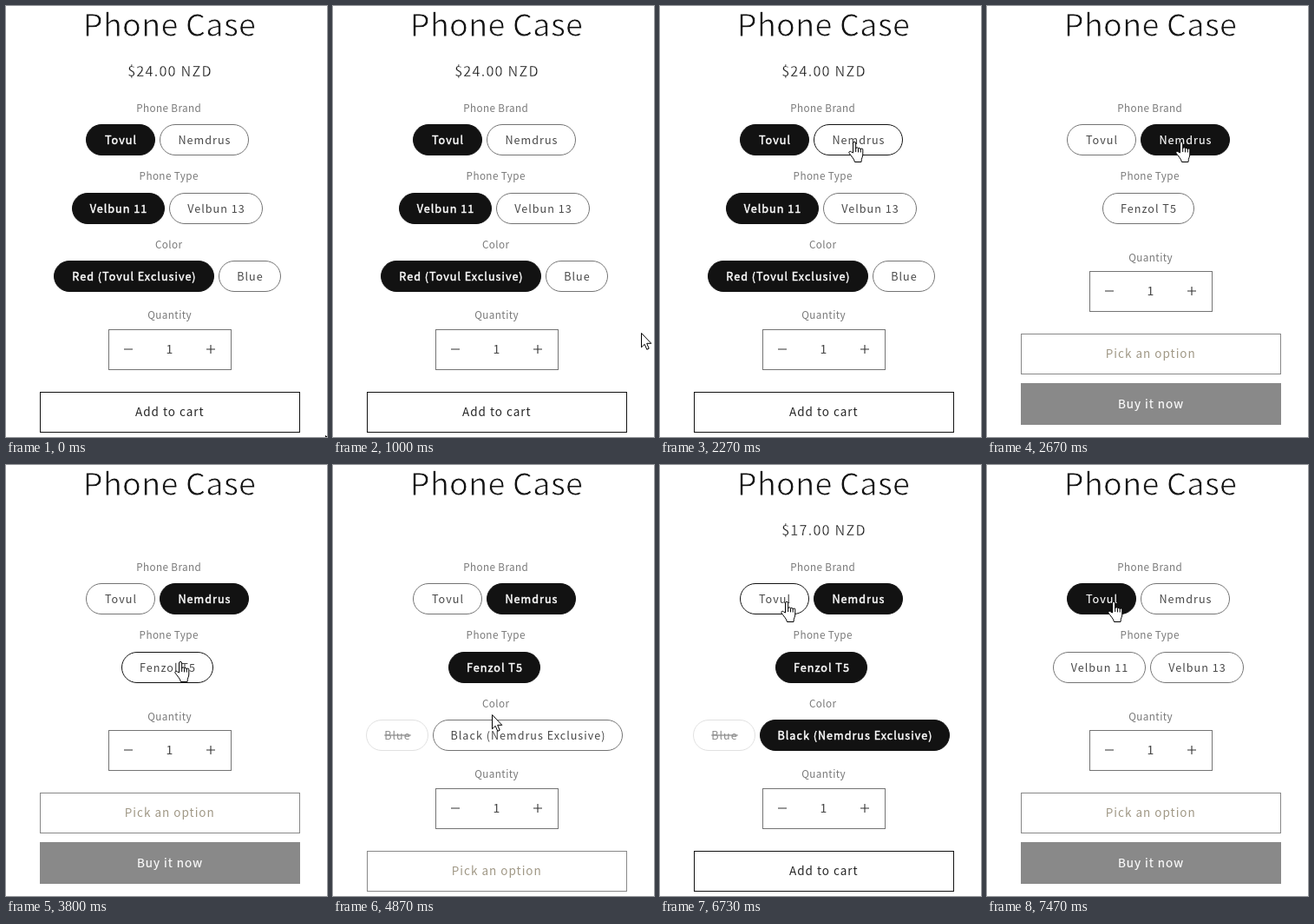
Write an HTML page that moves like this. It is 370x496 px and loops after 8 s.

```html
<!DOCTYPE html>
<html lang="en">
<head>
<meta charset="utf-8">
<title>Phone case options</title>
<style>
  html, body { margin: 0; width: 100%; height: 100%; overflow: hidden; background: #fff; }
  svg { display: block; width: 370px; height: 496px; }
  text {
    font-family: "Noto Sans CJK JP", "Noto Sans CJK SC", "Noto Sans CJK", "Noto Sans", sans-serif;
    font-weight: 400; fill: #121212; text-anchor: middle; white-space: pre;
  }
  rect { fill: none; stroke: #747474; }
  /* A white outline thins the letters */
  .title { font-size: 36px; letter-spacing: .3px; stroke: #fff; stroke-width: .8px; }
  .price { font-size: 16.2px; letter-spacing: 1.2px; stroke: #fff; stroke-width: .3px; }
  .label { font-size: 11.7px; letter-spacing: .4px; fill: #787878; }
  .count { font-size: 14px; fill: #484848; }
  .button { font-size: 13.5px; letter-spacing: 1px; }
  .pill text { font-size: 12.6px; letter-spacing: 1px; fill: #484848; }
  .pill.hover rect { stroke: #121212; }
  .pill.on rect { fill: #121212; stroke: #121212; }
  .pill.on text { fill: #fff; stroke: #fff; stroke-width: .45px; }
  .pill.on.hover text { stroke-width: .15px; }
  .pill.off rect { stroke: #e1e1e1; }
  .pill.off text { fill: #8c8c8c; text-decoration: line-through; }
  rect.add { stroke: #121212; }
  text.add { fill: #262626; }
  rect.wait { stroke: #888; }
  text.wait { fill: #a09886; }
  rect.buy { fill: #898989; stroke: none; }
  text.buy { fill: #fff; stroke: #fff; stroke-width: .15px; }
  .sign { stroke: #333; stroke-width: 1.1; }
  #cursor path { fill: #fff; stroke: #000; stroke-linejoin: round; }
</style>
</head>
<body>
<svg viewBox="0 0 370 496">
  <text class="title" x="188.6" y="35">Phone Case</text>
  <g id="form"></g>
  <g id="cursor">
    <path id="arrow" d="M.5.5V16.8L4.2 13.3 6.8 19.3 9.2 18.2 6.7 12.3H11.8Z"/>
    <g id="hand" transform="translate(-7 0)">
      <path d="M5.5 13V2a1.6 1.6 0 0 1 3.2 0V8a1.4 1.4 0 0 1 2.8.4a1.4 1.4 0 0 1 2.7.6a1.3 1.3 0 0 1 2.6.8V15C16.8 18 15 19 15 23.5H7.5C7 20 3 16.5 1 13.2C.2 11.6 2 10.6 3.4 11.8Z"/>
      <path d="M8.7 8v4M11.5 8.4v4M14.2 9v3.5"/>
    </g>
  </g>
</svg>
<script>
const FPS = 15, LOOP = 8000;
const $ = id => document.getElementById(id);

// Easing curves
const linear = p => p;
const smooth = p => p * p * (3 - 2 * p);
const soft = p => (p + smooth(p)) / 2;
const speedUp = p => p ** 1.5;
const slowDown = p => 1 - (1 - p) ** 1.5;

// Pointer path: tick, x, y, easing from the previous point
const path = [
  [8, 368, 494, linear], [21, 344, 279, soft], [24, 324, 241, linear], [34, 224, 156, slowDown],
  [49, 224, 156, linear], [57, 201, 226, smooth], [67, 201, 226, linear],
  [73, 183, 287, speedUp], [76, 183, 311, slowDown], [94, 183, 311, linear], [101, 146, 157, smooth]
];

function pointer(tick) {
  const i = path.findIndex(k => k[0] >= tick);
  if (i < 0) return path[path.length - 1].slice(1, 3);
  if (i === 0) return path[0].slice(1, 3);
  const [t0, x0, y0] = path[i - 1], [t1, x1, y1, ease] = path[i];
  const p = ease((tick - t0) / (t1 - t0));
  return [Math.round(x0 + (x1 - x0) * p), Math.round(y0 + (y1 - y0) * p)];
}

// Each pill: name, left, right, top, state
function pills(tick) {
  const on = test => test ? "on" : "";
  const first = tick < 40 || tick >= 112;
  const list = [
    ["Tovul", 92, 172, 136, on(first)],
    ["Nemdrus", 177, 280, 136, on(!first)]
  ];
  if (first) {
    list.push(["Velbun 11", 76, 183, 215, on(tick < 40)], ["Velbun 13", 188, 296, 215, ""]);
  } else {
    list.push(["Fenzol T5", 133, 239, 215, on(tick >= 60)]);
  }
  if (tick < 40) {
    list.push(["Red (Tovul Exclusive)", 55, 240, 293, "on"], ["Blue", 245, 317, 293, ""]);
  } else if (tick >= 60 && tick < 112) {
    list.push(["Blue", 38, 110, 293, "off"], ["Black (Nemdrus Exclusive)", 115, 334, 293, on(tick >= 79)]);
  }
  return list;
}

const text = (kind, x, y, value) => `<text class="${kind}" x="${x}" y="${y}">${value}</text>`;
const box = (kind, x, y, w, h, r = 0) =>
  `<rect class="${kind}" x="${x + .5}" y="${y + .5}" width="${w - 1}" height="${h - 1}" rx="${r}"/>`;
const label = (y, value) => text("label", 187.7, y, value);

function pill([name, left, right, top, state], hover) {
  return `<g class="pill ${state} ${hover ? "hover" : ""}">` +
    box("", left, top, right - left, 36, 17.5) +
    text("", (left + right) / 2 + .5, top + 23, name) + "</g>";
}

function footer(compact, ready) {
  const dy = compact ? -67 : 0, kind = ready ? "add" : "wait", mid = 395 + dy;
  let out = text("label", 188.7, compact ? 294 : 360, "Quantity") +
    box("", 118, 372 + dy, 142, 47) +
    text("count", 188.5, 400 + dy, "1") +
    `<path class="sign" d="M136 ${mid}h10M231 ${mid}h10M236 ${mid - 5}v10"/>` +
    box(kind, 39, 444 + dy, 300, 47) +
    text("button " + kind, 188.8, 472 + dy, ready ? "Add to cart" : "Pick an option");
  if (compact) {
    out += `<rect class="buy" x="39" y="434" width="300" height="48"/>` +
      text("button buy", 189, 463, "Buy it now");
  }
  return out;
}

function draw(tick) {
  const [x, y] = pointer(tick);
  const inside = ([, left, right, top, state]) =>
    state !== "off" && x >= left && x < right && y >= top && y < top + 36;
  const list = pills(tick);
  const price = tick < 40 ? "$24.00 NZD" : tick >= 89 && tick < 112 ? "$17.00 NZD" : "";
  const colors = tick < 40 || (tick >= 60 && tick < 112);

  $("form").innerHTML = text("price", 189, 81, price) +
    label(122, "Phone Brand") + label(200, "Phone Type") +
    (colors ? label(279, "Color") : "") +
    list.map(p => pill(p, inside(p))).join("") +
    footer(!colors, price !== "");

  const over = list.some(inside);
  $("hand").style.display = over ? "" : "none";
  $("arrow").style.display = over ? "none" : "";
  $("cursor").setAttribute("transform", `translate(${x} ${y})`);
}

let start, last = -1;
function run(now) {
  start ??= now;
  const tick = Math.floor((now - start) % LOOP * FPS / 1000 + .1);
  if (tick !== last) draw(last = tick);
  requestAnimationFrame(run);
}
draw(0);
requestAnimationFrame(run);
</script>
</body>
</html>
```
